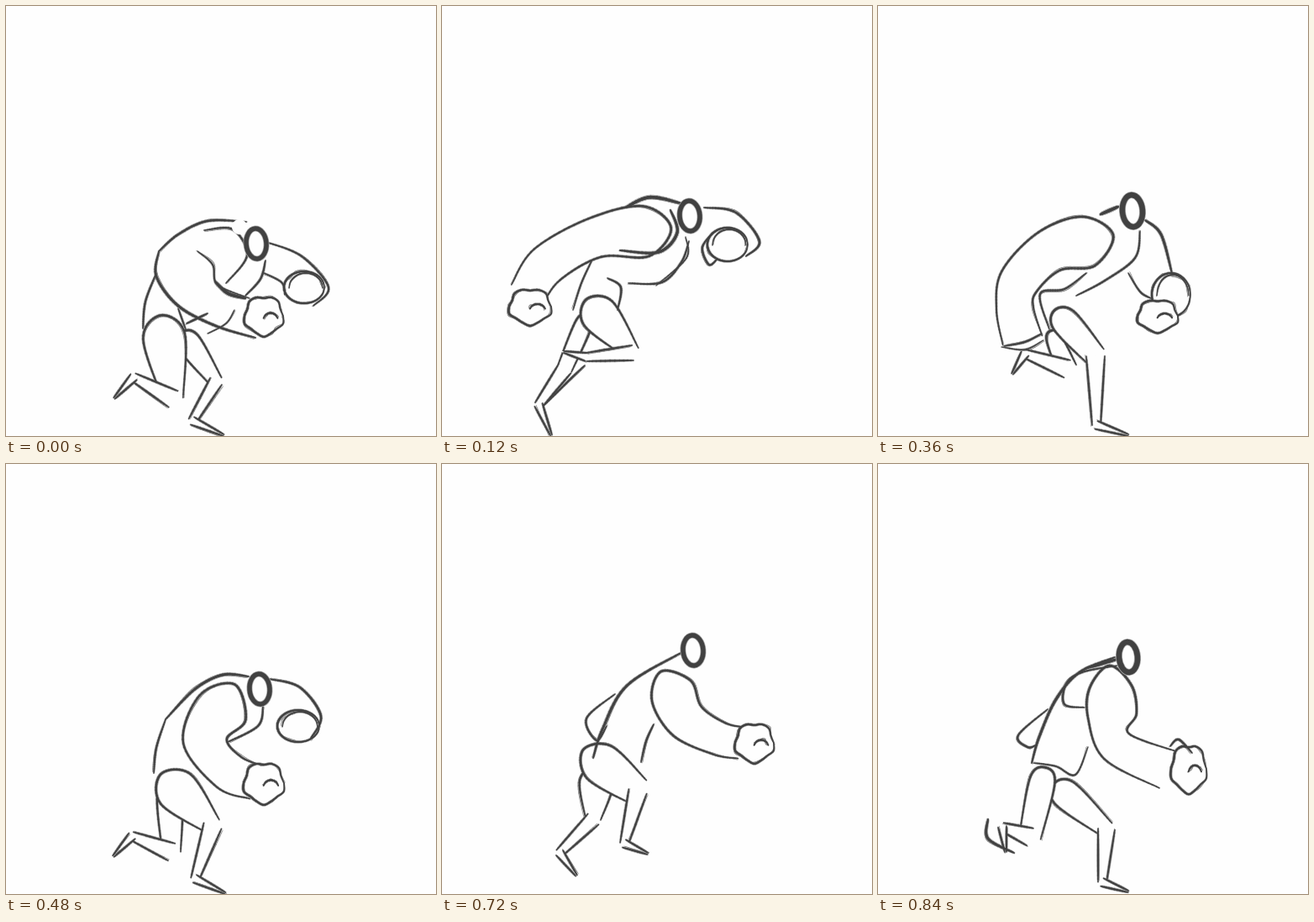
An HTML page with a canvas for the animation above (0.96 s loop, 512 by 512 pixels).

```html
<!DOCTYPE html>
<html lang="en">
<head>
<meta charset="utf-8">
<title>Pencil run cycle</title>
<style>
html, body { margin: 0; width: 100%; height: 100%; overflow: hidden; background: #fefefe; }
canvas { display: block; width: 100vw; height: 100vh; }
</style>
</head>
<body>
<canvas id="stage" width="512" height="512"></canvas>
<script>
const ctx = document.getElementById('stage').getContext('2d');
const HOLD = 120;
const PAPER = '#fefefe', GRAPHITE = '#414141', SMUDGE = '#b4b4b4', SKETCH = '#8a8a8a';

// Catmull-Rom curve through the given points.
function smooth(points) {
  const at = i => points[Math.max(0, Math.min(points.length - 1, i))];
  const curve = [];
  for (let i = 0; i < points.length - 1; i++) {
    for (let k = 0; k < 12; k++) {
      const t = k / 12;
      curve.push([0, 1].map(axis => {
        const [a, b, c, d] = [-1, 0, 1, 2].map(n => at(i + n)[axis]);
        return b + t * (c - a + t * (2 * a - 5 * b + 4 * c - d + t * (3 * b - a - 3 * c + d))) / 2;
      }));
    }
  }
  return [...curve, at(points.length - 1)];
}

function pencil(points, width, color) {
  const curve = smooth(points), last = curve.length - 1;
  ctx.strokeStyle = color;
  for (let i = 0; i < last; i++) {
    // Pressure fades towards both ends.
    ctx.lineWidth = width * (0.45 + 0.55 * Math.sqrt(Math.sin(Math.PI * (i + 0.5) / last)));
    ctx.beginPath();
    ctx.moveTo(...curve[i]);
    ctx.lineTo(...curve[i + 1]);
    ctx.stroke();
  }
}

function sketch(points, width = 3) {
  const wobble = points.map(([x, y]) => [x + 1.7 * Math.sin(x + 3 * y), y + 1.7 * Math.sin(5 * x + y)]);
  ctx.globalCompositeOperation = 'darken';
  pencil(points, width + 0.8, SMUDGE);
  pencil(wobble, 1, SKETCH);
  pencil(points, width * 0.75, GRAPHITE);
}

function erase(points) {
  ctx.globalCompositeOperation = 'source-over';
  ctx.fillStyle = PAPER;
  ctx.beginPath();
  smooth(points).forEach(p => ctx.lineTo(...p));
  ctx.fill();
}

function line(width, ...xy) {
  const points = [];
  for (let i = 0; i < xy.length; i += 2) points.push([xy[i], xy[i + 1]]);
  sketch(points, width);
}

// Both edges of a chain of [x, y, radius] joints, and the round tip before the first joint.
function edges(joints) {
  const left = [], right = [];
  let tip;
  joints.forEach(([x, y, r], i) => {
    const [ax, ay] = joints[Math.max(0, i - 1)];
    const [bx, by] = joints[Math.min(joints.length - 1, i + 1)];
    const length = Math.hypot(bx - ax, by - ay);
    const dx = (bx - ax) / length * r, dy = (by - ay) / length * r;
    left.push([x + dy, y - dx]);
    right.push([x - dy, y + dx]);
    tip = tip || [x - dx, y - dy];
  });
  return { left, right, tip };
}

function limb(...joints) {
  const { left, right, tip } = edges(joints);
  const outline = [...left.reverse(), tip, ...right];
  erase(outline);
  sketch(outline, 3.4);
}

function bone(...joints) {
  const { left, right } = edges(joints);
  erase([...left, ...[...right].reverse()]);
  sketch(left);
  sketch(right);
}

function leg(hip, knee, ankle, toe) {
  limb(hip, knee);
  bone([knee[0], knee[1], Math.min(knee[2], 11)], [...ankle, 5]);
  bone([...ankle, 5], [...toe, 1]);
}

function loop(x, y, rx, ry, bumps = 0) {
  return Array.from({ length: 17 }, (_, i) => {
    const angle = i / 8 * Math.PI;
    const swell = 1 + bumps * Math.sin(5 * angle);
    return [x + rx * swell * Math.cos(angle), y + ry * swell * Math.sin(angle)];
  });
}

function fist(x, y, rx, ry = rx) {
  const outline = loop(x, y, rx, ry, 0.08);
  erase(outline);
  sketch(outline);
  sketch(loop(x + rx * 0.35, y + ry * 0.3, rx * 0.4, ry * 0.45).slice(9, 16), 2.5);
}

function head(x, y, rx, ry) {
  sketch(loop(x, y, rx, ry), 2.8);
  sketch(loop(x + 2, y + 1, rx - 4, ry - 1).slice(8), 2);
}

function ring(x, y, rx = 12, ry = 18, width = 6) {
  ctx.globalCompositeOperation = 'source-over';
  ctx.fillStyle = PAPER;
  ctx.beginPath();
  ctx.ellipse(x, y, rx, ry, -0.08, 0, 2 * Math.PI);
  ctx.fill();
  for (const [extra, color] of [[1, '#a8a8a8'], [-0.5, GRAPHITE]]) {
    ctx.lineWidth = width + extra;
    ctx.strokeStyle = color;
    ctx.stroke();
  }
}

function crouch() {
  leg([217, 400, 14], [250, 447, 8], [222, 494], [259, 511]);
  leg([188, 393, 25], [199, 468, 12], [152, 442], [129, 467]);
  line(3, 163, 384, 166, 352, 179, 318);
  line(2.5, 205, 360, 214, 385);
  line(3, 215, 378, 240, 366);
  line(3.5, 182, 292, 205, 272, 240, 256, 286, 257);
  line(3, 236, 267, 270, 266, 287, 297, 262, 330);
  line(3, 310, 281, 352, 298, 384, 335, 366, 357);
  line(2.5, 305, 317, 328, 329, 332, 344);
  head(355, 335, 24, 19);
  line(4, 182, 292, 179, 322, 205, 357, 250, 381, 297, 395);
  line(2.5, 228, 292, 246, 308, 252, 332, 290, 348);
  line(5, 249, 328, 264, 342, 285, 348);
  line(3, 285, 345, 303, 325, 309, 303);
  line(2, 240, 390, 262, 378, 272, 362);
  fist(307, 369, 23);
  ring(298, 283);
  erase(loop(278, 263, 9, 9));
}

function armBack() {
  leg([169, 378, 10], [146, 432, 9], [115, 475], [130, 511]);
  leg([186, 366, 22], [227, 413, 9], [172, 418], [145, 412]);
  line(3, 170, 428, 150, 447, 122, 475);
  line(2.5, 180, 300, 166, 330, 156, 362);
  line(3, 294, 280, 285, 305, 262, 329, 222, 330);
  line(2, 290, 275, 291, 300, 255, 333);
  line(3, 197, 324, 213, 335, 209, 362);
  line(5, 208, 247, 245, 228, 285, 235);
  limb([243, 268, 30], [182, 276, 24], [125, 308, 24], [101, 344, 22]);
  line(4.5, 212, 291, 258, 293, 280, 270, 272, 243);
  fist(105, 358, 25, 21);
  head(340, 284, 24, 20);
  line(3.5, 312, 240, 350, 246, 378, 280, 362, 298);
  line(3, 322, 270, 310, 288, 318, 308, 328, 301);
  ring(295, 250);
}

function floatingLegs() {
  leg([184, 378, 20], [180, 423, 9], [140, 463], [160, 490]);
  leg([187, 355, 24], [233, 390, 17], [217, 452], [245, 464]);
}

function lift() {
  floatingLegs();
  line(2.5, 180, 300, 168, 322, 158, 331);
  line(4, 212, 334, 235, 315);
  line(3, 300, 245, 302, 278, 280, 302, 222, 313, 195, 294);
  line(8, 240, 223, 258, 217, 282, 215);
  limb([250, 256, 30], [188, 268, 24], [143, 300, 22], [114, 340, 22]);
  line(3, 250, 287, 278, 275, 284, 252, 270, 228);
  fist(124, 351, 26, 20);
  head(335, 286, 25, 19);
  line(3.5, 312, 230, 345, 245, 369, 275, 348, 308);
  line(3.5, 331, 270, 364, 282);
  ring(298, 222);
}

function plant() {
  leg([209, 395, 9], [225, 432, 12], [175, 414], [160, 438]);
  leg([221, 374, 16], [259, 417, 13], [260, 499], [298, 511]);
  line(3, 312, 268, 306, 300, 270, 327, 236, 345);
  line(3, 248, 318, 222, 337, 193, 343, 204, 385);
  line(5, 265, 248, 286, 239);
  limb([251, 280, 30], [204, 292, 26], [168, 328, 24], [163, 360, 22], [172, 398, 24]);
  line(3, 150, 405, 175, 400, 195, 390);
  line(2, 147, 406, 175, 409, 197, 398);
  line(4, 318, 255, 337, 272, 350, 318);
  line(2.5, 298, 318, 312, 340, 325, 348);
  head(349, 344, 23, 26);
  fist(333, 369, 24, 19);
  ring(303, 244, 12, 19, 7);
}

function pass() {
  leg([195, 395, 15], [197, 462, 11], [150, 443], [128, 467]);
  leg([202, 387, 25], [246, 431, 11], [225, 494], [261, 511]);
  line(3, 176, 368, 179, 338, 190, 304);
  line(4, 190, 304, 225, 268, 258, 251, 289, 253);
  line(3, 306, 288, 300, 312, 262, 332);
  limb([258, 290, 31], [237, 330, 26], [266, 367, 23], [298, 379, 21]);
  fist(307, 380, 24);
  head(348, 312, 25, 19);
  line(3.5, 314, 256, 350, 266, 375, 300, 362, 328);
  ring(302, 268);
}

function push() {
  leg([214, 383, 17], [265, 412, 10], [213, 402], [236, 430]);
  leg([189, 375, 14], [146, 440, 15], [104, 484], [142, 511]);
  line(3, 181, 355, 152, 412, 99, 486);
  line(2, 86, 485, 105, 487);
  line(4, 193, 397, 216, 383);
  line(3, 156, 314, 151, 288, 170, 258, 208, 236);
  line(4.5, 198, 238, 237, 243);
  line(3, 145, 312, 165, 325, 185, 322, 182, 300);
  line(1.5, 168, 275, 190, 250);
  line(3.5, 178, 355, 195, 315, 212, 274, 240, 243, 290, 231);
  line(2, 238, 227, 265, 226, 290, 231);
  line(3.5, 302, 308, 275, 321, 235, 325, 231, 360);
  line(3, 240, 322, 270, 328, 298, 315);
  line(2.5, 172, 348, 210, 361, 228, 359);
  ring(300, 242, 13, 11, 3);
  limb([270, 272, 22], [317, 283, 21], [364, 303, 24]);
  line(5, 300, 251, 325, 262, 351, 279);
  fist(383, 298, 22, 28);
  line(3, 374, 266, 378, 251, 392, 256, 388, 268);
}

function reach() {
  floatingLegs();
  line(3, 206, 274, 172, 303, 184, 329, 196, 312);
  line(4, 180, 350, 191, 316, 220, 264, 286, 224);
  line(3, 252, 310, 243, 330, 237, 355);
  limb([273, 270, 26], [292, 306, 24], [330, 327, 20], [356, 332, 19]);
  fist(372, 332, 23);
  ring(299, 222);
}

function swing() {
  leg([222, 392, 17], [272, 435, 10], [267, 498], [298, 509]);
  leg([196, 376, 15], [181, 444, 13], [148, 432], [152, 462]);
  line(4, 131, 423, 131, 446, 162, 463);
  line(3, 202, 292, 167, 323, 178, 337, 188, 335);
  line(4, 282, 230, 240, 248, 212, 280, 192, 325, 183, 356);
  line(5, 248, 243, 286, 232);
  line(2.5, 185, 356, 212, 360, 235, 370, 250, 337);
  limb([277, 265, 25], [279, 300, 29], [284, 336, 21], [345, 364, 24]);
  line(3, 246, 290, 222, 286, 224, 262, 243, 248, 285, 240);
  fist(370, 363, 21, 28);
  line(3, 348, 336, 358, 328, 374, 344);
  ring(298, 230, 11, 18, 7);
}

const poses = [crouch, armBack, lift, plant, pass, push, reach, swing];
const start = performance.now();
let shown = -1;

function tick() {
  const index = Math.floor((performance.now() - start) / HOLD) % poses.length;
  if (index !== shown) {
    shown = index;
    ctx.globalCompositeOperation = 'source-over';
    ctx.fillStyle = PAPER;
    ctx.fillRect(0, 0, 512, 512);
    ctx.lineCap = 'round';
    poses[index]();
  }
  requestAnimationFrame(tick);
}
tick();
</script>
</body>
</html>
```
